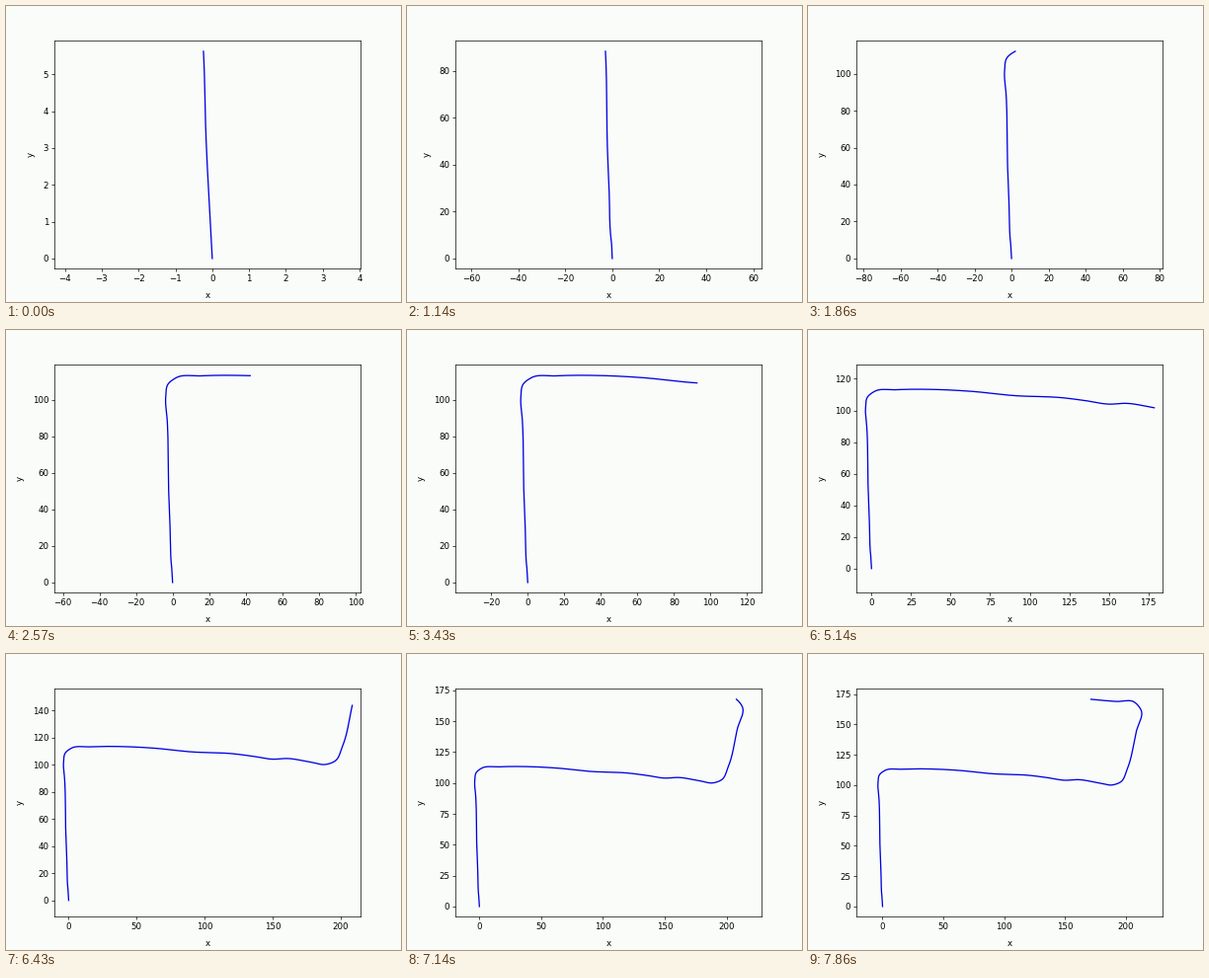
A matplotlib script that plays this animation: 400x300 px, repeating every 8 s.

```python
import numpy as np
import matplotlib.pyplot as plt
from matplotlib.animation import FuncAnimation

LOOP_MS = 8000
POSES = 56  # distinct pictures per loop
SUB = 4     # timer ticks per picture
PAPER = "#fafcfa"
W, H = 400, 300
AX_W, AX_H = 310, 231  # axes size in pixels

# Bends of the road: x, y and, where known, the pose at which the tip is there
ROAD = [
    (0, 0, None), (-.17, 3.3, None), (-.24, 5.63, 0), (-.7, 10, .5),
    (-1.3, 28, None), (-2, 45, 4), (-2.9, 88.3, 8), (-3.75, 101.6, None),
    (-2.6, 108.4, 11.5), (2, 112.1, 13), (15.5, 113.1, None),
    (42.4, 113.2, 18), (63, 112.1, None), (90, 109.4, None),
    (121, 108, None), (135.3, 106.2, 29), (150, 104, None),
    (161, 104.5, 32), (178.7, 101.7, 36), (189, 100.1, None),
    (196.4, 102.9, 40), (201.5, 113.5, None), (208.7, 143.6, 45),
    (212.8, 161.8, 48), (206.9, 168.6, 50.3), (193.1, 168.9, None),
    (171.5, 170.7, 55),
]


def smooth(t, knots, values):
    """Cubic Hermite curve through the knots."""
    slope = np.gradient(values, knots)
    i = np.clip(np.searchsorted(knots, t, side="right") - 1, 0, len(knots) - 2)
    h = knots[i + 1] - knots[i]
    u = (t - knots[i]) / h
    return (values[i] * (1 + 2 * u) * (1 - u) ** 2
            + values[i + 1] * u * u * (3 - 2 * u)
            + h * slope[i] * u * (1 - u) ** 2
            + h * slope[i + 1] * u * u * (u - 1))


xs, ys, when = np.array(ROAD, float).T  # None becomes nan
dist = np.concatenate([[0], np.cumsum(np.hypot(np.diff(xs), np.diff(ys)))])
timed = ~np.isnan(when)
travel = smooth(np.arange(POSES), when[timed], dist[timed])

fig = plt.figure(figsize=(6.4, 4.8), dpi=62.5, facecolor=PAPER)
# Slight offset keeps the spines on whole pixels
ax = fig.add_axes([49.4 / W, 33.6 / H, AX_W / W, AX_H / H], facecolor=PAPER)
ax.set_xlabel("x", labelpad=9)
ax.set_ylabel("y", labelpad=9)
line, = ax.plot([], [], color="#0000e0", lw=1.5)


def draw(tick):
    pose = min((tick + 1) // SUB, POSES - 1)
    end = travel[pose]
    s = np.append(dist[dist < end], np.linspace(0, end, 600))
    s.sort()
    x, y = smooth(s, dist, xs), smooth(s, dist, ys)
    line.set_data(x, y)

    # Equal units on both axes, centred on the path so far
    unit = max(1.06 * np.ptp(x) / AX_W, 1.1 * np.ptp(y) / AX_H)
    cx, cy = (x.min() + x.max()) / 2, (y.min() + y.max()) / 2
    ax.set_xlim(cx - unit * AX_W / 2, cx + unit * AX_W / 2)
    ax.set_ylim(cy - unit * AX_H / 2, cy + unit * AX_H / 2)
    return line,


ani = FuncAnimation(fig, draw, frames=POSES * SUB,
                    interval=LOOP_MS / (POSES * SUB),
                    repeat=True, repeat_delay=0, blit=False)
plt.show()
```
